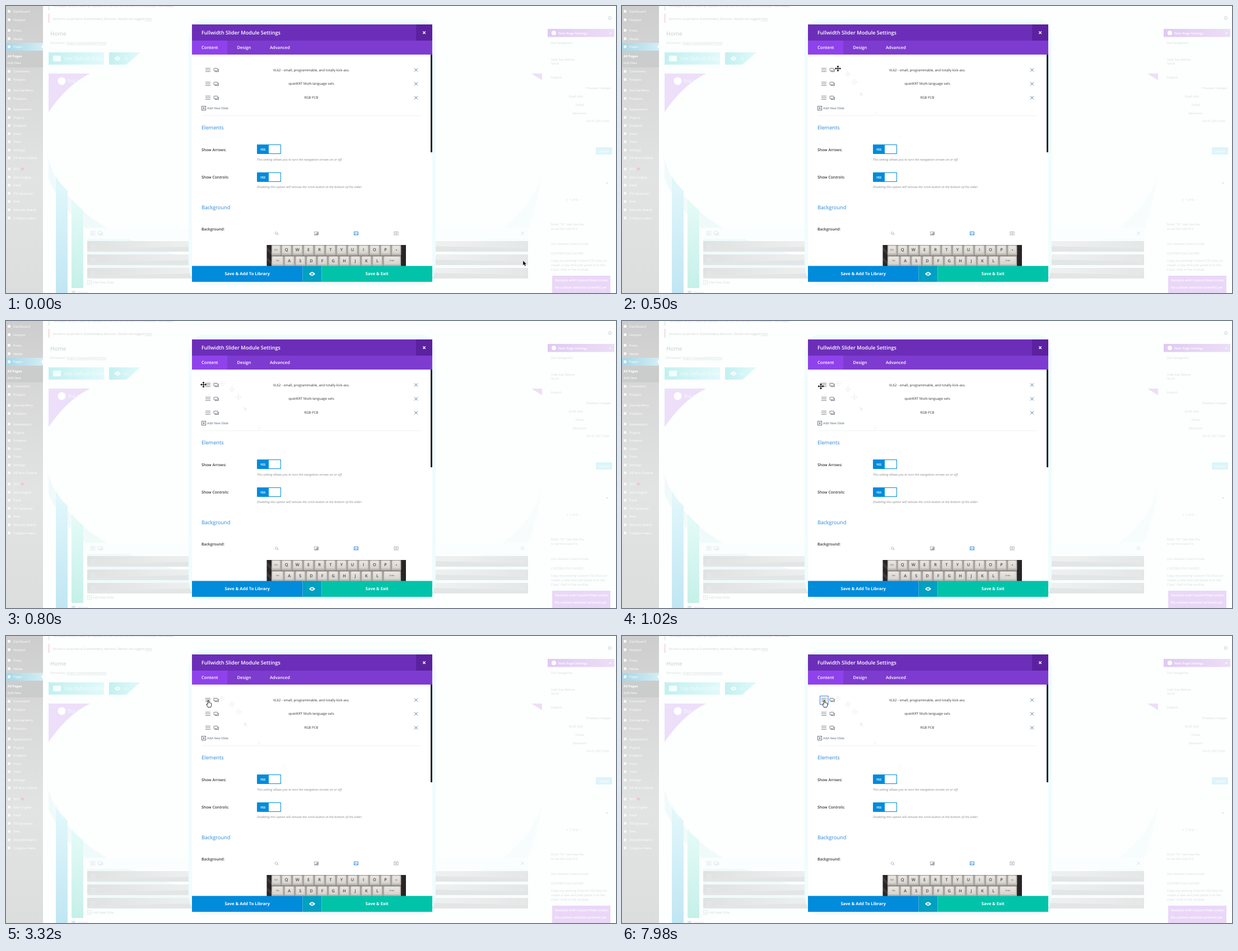
Recreate the animation shown at these times as an HTML page. Size 1089 by 514 pixels, loop 8000 ms.

```html
<!DOCTYPE html>
<html lang="en">
<head>
<meta charset="utf-8">
<title>Slider settings</title>
<style>
  html, body { margin: 0; width: 100%; height: 100%; overflow: hidden; background: #fcfffe; }
  svg { display: block; width: 100vw; height: 100vh; }
  text { font-family: "Open Sans", sans-serif; font-size: 5.8px; text-rendering: geometricPrecision; }
  .title { font-size: 9.1px; font-weight: 600; fill: #fff; }
  .tab { font-size: 7.6px; font-weight: 600; fill: #fff; }
  .action { font-size: 7.5px; font-weight: 700; fill: #fff; }
  .row { font-size: 6.05px; fill: #333; }
  .add { font-size: 5.7px; fill: #5b6b7b; }
  .heading { font-size: 9.2px; fill: #2b87da; }
  .label { font-size: 6.8px; font-weight: 600; fill: #32373c; }
  .hint { font-size: 5.6px; font-style: italic; fill: #8a8a8a; }
  .yes { font-size: 5.3px; font-weight: 700; fill: #fff; }
  .menu { fill: #fff; }
  .bold { fill: #fff; font-weight: 700; }
  .pale { fill: #d3dbdc; font-size: 5.6px; }
  .notice { fill: #d6ced0; font-size: 5.7px; }
  .home { fill: #c6cccd; font-size: 10px; }
  .button { fill: #f4fefe; font-size: 8.6px; }
  .update { fill: #fff; font-size: 5.6px; }
  .panel { fill: #fff; font-size: 5.8px; font-weight: 600; }
  .key { fill: #4a4643; font-size: 7.4px; font-weight: 600; }
  .small { fill: #4a4643; font-size: 3.6px; }
  .mid { text-anchor: middle; }
</style>
</head>
<body>
<svg viewBox="0 0 1089 514" preserveAspectRatio="none">
  <defs>
    <linearGradient id="side" x2="0" y2="1">
      <stop stop-color="#cdcdcd"/><stop offset=".25" stop-color="#d8d8d8"/>
      <stop offset=".6" stop-color="#e2e3e3"/><stop offset="1" stop-color="#dcdede"/>
    </linearGradient>
    <linearGradient id="current"><stop stop-color="#a6d7e8"/><stop offset="1" stop-color="#d3edf4"/></linearGradient>
    <linearGradient id="teal"><stop stop-color="#c3f0f0"/><stop offset="1" stop-color="#e2f9fa"/></linearGradient>
    <linearGradient id="lilac"><stop stop-color="#e0c9f2"/><stop offset="1" stop-color="#ecdef7"/></linearGradient>
    <linearGradient id="bar">
      <stop stop-color="#e0e2e2"/><stop offset=".2" stop-color="#eceeee"/>
      <stop offset=".82" stop-color="#eef0f0"/><stop offset="1" stop-color="#e5e7e7"/>
    </linearGradient>
    <linearGradient id="blueStripe" x2="0" y2="1">
      <stop stop-color="#e3f8fb"/><stop offset="1" stop-color="#c0e6f3"/>
    </linearGradient>
    <linearGradient id="greenStripe" x2="0" y2="1">
      <stop stop-color="#e6fbf8"/><stop offset="1" stop-color="#c5f0e8"/>
    </linearGradient>
    <linearGradient id="keycap" x2="0" y2="1">
      <stop stop-color="#ebe8e4"/><stop offset="1" stop-color="#d6d2ce"/>
    </linearGradient>
    <g id="lines" fill="none" stroke="currentColor"><path d="M-4.5-3h9M-4.5 0h9M-4.5 3h9"/></g>
    <g id="copy" fill="none" stroke="currentColor" stroke-width=".9">
      <rect x="-4" y="-3" width="7" height="4.6" rx=".8"/><path d="M-1.8 1.8V3.2H4.4V-.8H3"/>
    </g>
    <path id="cross" d="M-3-3L3 3M3-3L-3 3" stroke="currentColor"/>
    <g id="plus" fill="none" stroke="currentColor" stroke-width=".8">
      <rect x="-3.6" y="-3.6" width="7.2" height="7.2"/><path d="M-2 0h4M0-2v4"/>
    </g>
    <g id="eye">
      <path d="M-5.5 0Q0-7 5.5 0Q0 7-5.5 0Z" fill="#fff"/><circle r="1.8" fill="currentColor"/>
      <circle cx=".5" cy="-.5" r=".6" fill="#fff"/>
    </g>
    <path id="arrow" d="M0 0V8.6L2 6.8 3.5 10 5 9.3 3.6 6.3H6.2Z" stroke="#fff" stroke-width=".4"/>
    <path id="move" d="M0-5.6L2.1-3H.6V-.6H3V-2.1L5.6 0 3 2.1V.6H.6V3H2.1L0 5.6-2.1 3H-.6V.6H-3V2.1L-5.6 0-3-2.1V-.6H-.6V-3H-2.1Z"/>
    <path id="hand" d="M-1.6 0V-5.2Q-.7-6.8.3-5.2V-1.6Q1.4-2.3 2-1.2 3-1.8 3.6-.7 5-1 5 .5V3Q4.7 4.8 3.8 6.6H-1.2Q-3 3.8-4 1.8-4 .2-2.5.8L-1.6 1.6Z"
      fill="#fff" stroke="#111" stroke-width=".9"/>
  </defs>
  <g id="scene"></g>
  <g id="click">
    <rect id="focus" x="353.5" y="107.5" width="14.5" height="15" fill="none" stroke="#4f95e2" stroke-width="1.2"/>
    <circle id="pulse" cx="361" cy="114.8" r="7" fill="#3f6fe6"/>
  </g>
  <g id="cursors"></g>
</svg>
<script>
const LOOP = 8000;
const $ = id => document.getElementById(id);
const rect = (x, y, w, h, fill, rx = 0) =>
  `<rect x="${x}" y="${y}" width="${w}" height="${h}" fill="${fill}" rx="${rx}"/>`;
const path = (d, fill) => `<path d="${d}" fill="${fill}"/>`;
const dot = (x, y, r, fill) => `<circle cx="${x}" cy="${y}" r="${r}" fill="${fill}"/>`;
const text = (x, y, cls, str) => `<text x="${x}" y="${y}" class="${cls}">${str}</text>`;
const icon = (id, x, y, color) => `<use href="#${id}" x="${x}" y="${y}" color="${color}"/>`;
const texts = (cls, list) => list.map(([x, y, str]) => text(x, y, cls, str)).join('');

function sidebar() {
  const items = [
    [9.5, 'Dashboard'], [24.5, 'Fenpost'], [43.5, 'Posts'], [58.5, 'Media'], [73, 'Pages'],
    [117, 'Comments'], [131.5, 'Projects'], [151, 'Zunmarketry'], [165.5, 'Products'],
    [184.5, 'Appearance'], [199.5, 'Plugins'], [214, 'Snippets'], [228.5, 'Users'], [243, 'Tools'],
    [258, 'Settings'], [272, 'DB Row Cleaner'], [292, 'SEO'], [306.5, 'Nelo Engine'], [321, 'Petal'],
    [335.5, 'TR Optimizer'], [350, 'Nelo'], [365, 'Velunda Search'], [379.5, 'Collapse menu']
  ];
  return rect(0, 0, 66, 514, 'url(#side)')
    + rect(0, 66, 66, 14, 'url(#current)') + path('M66 69.500V76.500L62.500 73Z', '#fcfffe')
    + rect(0, 80, 66, 30, '#cbcdcd')
    + text(2.5, 91.5, 'bold', 'All Pages') + text(2.5, 103.5, 'menu', 'Add New')
    + items.map(([y, name]) => rect(3, y - 2.5, 5, 5, '#f6f8f8', 1.5) + text(13, y + 2, 'menu', name)).join('')
    + dot(29.5, 292, 2.4, '#f2c4c1');
}

function page() {
  const bars = [421, 445, 469].map(y => rect(145, y, 787, 19, 'url(#bar)')
    + path(`M145 ${y + 19}H932V${y + 13}Q540 ${y + 2} 145 ${y + 15}Z`, '#e3e6e6')
    + icon('lines', 155, y + 10, '#e9ecec') + icon('cross', 922, y + 10, '#e9ecec')).join('');
  return rect(66, 0, 1023, 514, '#fcfffe')
    + rect(76, 0, 1.2, 8, '#cbebd0') + rect(76, 14, 1.2, 16, '#f2c6c6')
    + texts('notice', [[84, 2, 'Template library needs an update to the current version of the builder, see details'],
      [84, 25, 'An error occurred in Zunmarketry Services. Details are logged <tspan text-decoration="underline">here</tspan>']])
    + text(79, 53, 'home', 'Home')
    + text(79, 68, 'pale', 'Permalink: <tspan text-decoration="underline">https://site.example/home/</tspan>')
    + rect(76, 83, 99, 22, 'url(#teal)') + rect(84, 89, 14, 10, '#f4fefe', 1) + text(104, 97, 'button', 'Use Default Editor')
    + path('M184 83H240L215 105H184Z', 'url(#teal)') + icon('eye', 199, 94, '#cdf3f3') + text(211, 97, 'button', 'U')
    + path('M76 121H150Q108 142 76 190Z', '#eddff9') + dot(99.5, 134.5, 7, '#fff')
    + text(110, 138, 'button', 'The Nelo')
    + path('M938 121H957V133Z', '#eedff9')
    + path('M76 275Q115 405 332 452V470H145V400Q100 365 76 310Z', '#f1fafa')
    + path('M957 300Q925 410 761 452V468H932V400Q950 350 957 300Z', '#f7fdfd')
    + path('M89 304Q97 320 110 331V514H89Z', 'url(#blueStripe)')
    + path('M117 345Q125 356 138 366V505H117Z', 'url(#greenStripe)')
    + rect(145, 397, 787, 20, '#fafefe')
    + icon('lines', 155, 407, '#dde3e3') + icon('copy', 168, 407, '#dde3e3') + icon('cross', 922, 407, '#dde3e3')
    + bars + icon('plus', 149, 495, '#dce7e7') + text(155, 497, 'pale', 'Add New Slide')
    + rect(117, 510, 7, 4, '#dceaea') + text(128, 515, 'pale', 'Section')
    + path('M354 24H740Q764 24 767 60V465Q764 500 738 500H354Q330 500 326 465V60Q330 24 354 24Z', '#f0fcfd');
}

function rightPanel() {
  return rect(967, 41, 119, 14.5, 'url(#lilac)') + dot(978, 48.2, 4, '#fff')
    + text(986, 50.5, 'panel', 'Nelo Page Settings') + path('M1077 49.500L1079 47L1081 49.500Z', '#fff')
    + '<circle cx="1078" cy="21.500" r="2.5" fill="none" stroke="#c5cdce"/>'
    + texts('pale', [[973, 67.5, 'Dot Navigation'], [973, 97.5, 'Hide Nav Before'], [973, 105, 'Scroll'],
      [973, 130, 'Publish'], [1036, 149, 'Preview Changes'], [1005, 164, 'Draft Edit'], [1017, 179, 'Public'],
      [1012, 193.5, 'Revisions'], [1036, 208, 'Oct 9, 2017 Edit'],
      [973, 393, 'Enter "h1" text like this'], [973, 401, 'to set the size of it'],
      [973, 428, 'Our chosen Custom Code'], [973, 445, 'CUSTOM CSS CLASSES'],
      [973, 458, 'Copy any existing Custom CSS class (or'], [973, 466, 'create a new one) and paste it on the'],
      [973, 474, 'Class" field of the module']])
    + text(1000, 349, 'pale', '✓ 1 of 6 &nbsp;↑') + dot(1073, 317, 1, '#c3cdce')
    + rect(1053, 253, 29, 13, '#dcf5f9') + text(1058, 261.5, 'update', 'Update')
    + rect(975, 483, 104, 31, '#ead7f8')
    + texts('panel', [[980, 493, 'Sections with Custom Rows (roles)'], [980, 506, 'No custom selected currently yet']]);
}

function keyboard() {
  const key = (x, y, w, cls, label) => rect(x, y, w, 18, '#bcb7b2', 1.5)
    + rect(x + 1.7, y + 1, w - 3.6, 14, 'url(#keycap)', 1.5)
    + text(x + w / 2 - .2, y + (cls === 'key' ? 10.5 : 9.3), `${cls} mid`, label);
  const pitch = 19.65;
  return rect(465.5, 428, 248.5, 38, '#292526') + rect(474, 428, 231, 38, '#86807c')
    + path('M466 432L474 440V446L466 438ZM466 450L474 458V464L466 456Z', '#3c3738')
    + [...'QWERTYUIOP'].map((c, i) => key(491.5 + i * pitch, 428.5, 18.8, 'key', c)).join('')
    + key(474, 428.5, 16.8, 'small', 'ESC') + key(688, 428.5, 17.3, 'small', '◄')
    + [...'ASDFGHJKL'].map((c, i) => key(496.5 + i * pitch, 448, 18.8, 'key', c)).join('')
    + key(474, 448, 21.8, 'small', 'Tab') + key(673.5, 448, 31.5, 'small', 'Enter');
}

function toggle(y) {
  return rect(448, y, 43, 17, '#008bdb', 1) + rect(469, y + 1, 21, 15, '#fff', 1)
    + text(454, y + 10.5, 'yes', 'YES');
}

function modal() {
  const rows = ['VL62 - small, programmable, and totally kick-ass.', 'quietKRT Multi-language sets', 'RGB PCB'];
  return rect(332, 33, 429, 461, '#fff')
    + rect(332, 33, 429, 29, '#6c2eb9') + rect(732, 33, 29, 29, '#5c219f')
    + '<path d="M744.400 45.600l4.400 4.400m0-4.400l-4.400 4.400" stroke="#fff" stroke-width="1.400"/>'
    + rect(332, 62, 429, 25, '#7e3bd0') + rect(332, 62, 63, 25, '#8f42ec')
    + text(349, 51.2, 'title', 'Fullwidth Slider Module Settings')
    + texts('tab', [[349, 77, 'Content'], [412.5, 77, 'Design'], [471, 77, 'Advanced']])
    + rows.map((name, i) => {
      const y = 114.5 + i * 24.9;
      return icon('lines', 360.5, y, '#858585') + icon('copy', 375, y, '#68727c')
        + icon('cross', 732, y, '#597b9b') + text(545, y + 2, 'row mid', name);
    }).join('')
    + icon('plus', 353, 183, '#4d5b68') + text(359, 185, 'add', 'Add New Slide')
    + rect(349, 196, 391, 1, '#f0f3f3')
    + texts('heading', [[349, 221.2, 'Elements'], [349, 364.2, 'Background']])
    + texts('label', [[349, 259.5, 'Show Arrows:'], [349, 309.3, 'Show Controls:'], [349, 402.3, 'Background:']])
    + toggle(248) + toggle(298)
    + texts('hint', [[448, 276.5, 'This setting allows you to turn the navigation arrows on or off.'],
      [448, 326.3, 'Disabling this option will remove the circle button at the bottom of the slider.']])
    + '<g fill="none" stroke="#a3a9ae" stroke-width=".9">'
    + '<path d="M480 407l2.600-2.800 2.600 2.800-2.600 2.800zM485.500 408v2"/>'
    + '<rect x="550.500" y="404.500" width="7" height="5.500"/><path d="M551 410l6-5v5z" fill="#a3a9ae"/>'
    + '<rect x="693" y="404.500" width="7" height="5.500"/><path d="M696 406v2.500l1.500-1.200z" fill="#a3a9ae"/>'
    + '<g stroke="#2b87da"><rect x="621.500" y="404.500" width="7" height="5.500"/>'
    + '<path d="M622 409l2-2 1.500 1.500 1-1 2 2M626.500 406h.5"/></g></g>'
    + keyboard()
    + rect(758, 87, 3, 175, '#20292f')
    + rect(332, 465.5, 197.5, 28.5, '#008bdb') + rect(529.5, 465.5, 34, 28.5, '#00a0c2')
    + rect(563.5, 465.5, 197.5, 28.5, '#00c3aa')
    + text(430.7, 482.3, 'action mid', 'Save &amp; Add To Library') + text(662.3, 482.3, 'action mid', 'Save &amp; Exit')
    + icon('eye', 546.5, 479.8, '#00a0c2');
}

$('scene').innerHTML = page() + sidebar() + rightPanel() + modal();

// Pointer stops: start time, shape, position, opacity of the trail left behind.
const stops = [
  [0, 'arrow', 923, 456, 0], [60, 'arrow', 620, 330, 0], [140, 'arrow', 494, 229, .01],
  [210, 'arrow', 450, 186, .02], [280, 'arrow', 425, 153, .06], [360, 'move', 415, 136, .06],
  [430, 'move', 403.5, 122, .06], [500, 'move', 385.5, 112, .06], [580, 'move', 371, 112, .05],
  [650, 'move', 361, 113, .04], [720, 'move', 355, 114, .03], [800, 'move', 352.5, 114, 0],
  [940, 'move', 353, 115, 0], [1010, 'move', 355, 117, 0], [1080, 'hand', 358, 119, 0],
  [1160, 'hand', 360, 120.5, 0], [1240, 'hand', 361.5, 121, 0], [3320, 'hand', 361.8, 121, 0]
];
$('cursors').innerHTML = stops.map(([, shape, x, y]) => icon(shape, x, y, '#000')).join('');
const cursors = [...$('cursors').children];

function render(t) {
  const current = stops.findLastIndex(([start]) => start <= t);
  cursors.forEach((cursor, i) => {
    cursor.setAttribute('opacity', i === current ? 1 : i < current ? stops[i][4] : 0);
  });
  $('pulse').setAttribute('opacity', t >= 7980 || t < 7820 ? 0 : t < 7910 ? .78 : .35);
  $('focus').setAttribute('opacity', t >= 7910 ? 1 : 0);
}

const begin = performance.now();
function tick() {
  render((performance.now() - begin) % LOOP);
  requestAnimationFrame(tick);
}
render(0);
requestAnimationFrame(tick);
</script>
</body>
</html>
```
